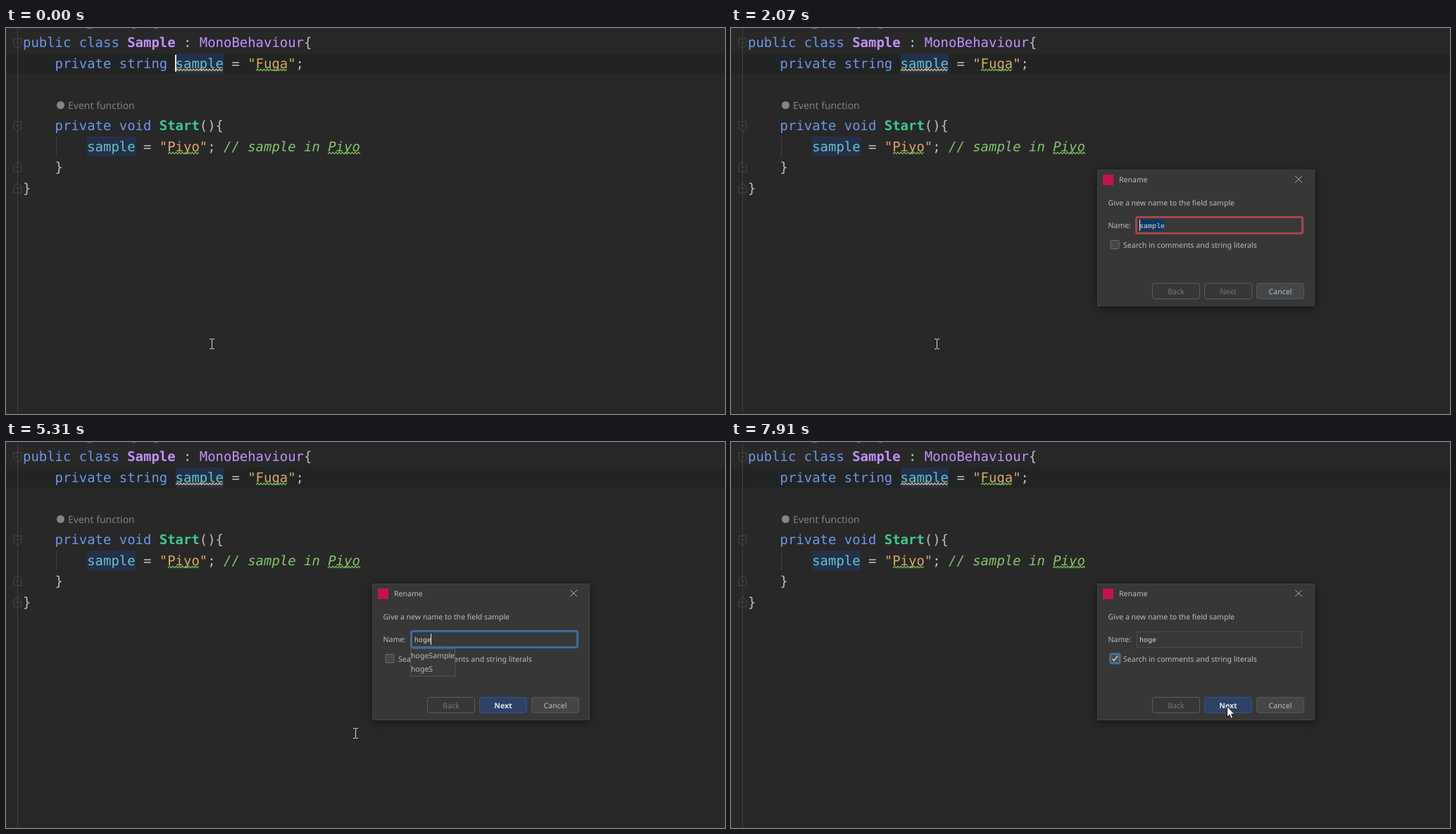
These frames come from a looping animation (1021 px wide and 548 px high, 8000 ms). An HTML page with a canvas:

```html
<!DOCTYPE html>
<html lang="en">
<head>
<meta charset="utf-8">
<title>Rename a field</title>
<style>
html, body { margin: 0; width: 100%; height: 100%; overflow: hidden; background: #282828; }
canvas { display: block; width: 1021px; height: 548px; }
</style>
</head>
<body>
<canvas id="stage" width="1021" height="548"></canvas>
<script>
const ctx = document.getElementById('stage').getContext('2d');
const LOOP = 8000, COL = 11.4, LINE = 29.57;
const MONO = '18.94px "DejaVu Sans Mono", monospace';
const UI = '10.55px "Noto Sans", sans-serif';
const FIELD = '10px "Liberation Mono", monospace';
const BLUE = '#6c95eb', PURPLE = '#c191ff', PLAIN = '#bdbdbd', CYAN = '#66c3cc',
      STRING = '#d9a962', GREEN = '#39cc8f', COMMENT = '#85c46c', LABEL = '#bbbbbb';
const WARNING = '#cfae68', TYPO = '#6fae4e';

// line, column, text, colour, style
const CODE = [
  [0, 0, 'public class', BLUE], [0, 13, 'Sample', PURPLE, 'bold'], [0, 20, ':', PLAIN],
  [0, 22, 'MonoBehaviour', PURPLE], [0, 35, '{', PLAIN],
  [1, 4, 'private string', BLUE], [1, 19, 'sample', CYAN], [1, 26, '=', PLAIN],
  [1, 28, '"Fuga"', STRING], [1, 34, ';', PLAIN],
  [4, 4, 'private void', BLUE], [4, 17, 'Start', GREEN, 'bold'], [4, 22, '(){', PLAIN],
  [5, 8, 'sample', CYAN], [5, 15, '=', PLAIN], [5, 17, '"Piyo"', STRING], [5, 23, ';', PLAIN],
  [5, 25, '// sample in Piyo', COMMENT, 'italic'],
  [6, 4, '}', PLAIN], [7, 0, '}', PLAIN]
];

// time, x, y of the pointer
const PATH = [
  [0, 292, 448], [3070, 292, 448], [3200, 299, 446], [4990, 299, 446],
  [5050, 312, 445], [5180, 420, 429], [5310, 496, 413], [5500, 526, 362], [5690, 534, 319],
  [5810, 534, 319], [6250, 539, 307], [7260, 539, 307],
  [7450, 572, 322], [7650, 655, 352], [7910, 704, 375], [8000, 704, 375]
];

// time, field text, popup stem
const TYPING = [[3990, 'h', 'h'], [4170, 'ho', 'ho'], [4420, 'hog', 'ho'], [4490, 'hog', 'hog'], [4740, 'hoge', 'hoge']];

// time, opacity of the opening window
const OPENING = [[1810, 0.18], [1880, 0.55], [1945, 0.85], [2005, 1]];

const within = (t, a, b) => t >= a && t < b;
const lastBefore = (list, t) => list.filter(item => item[0] <= t).pop();

function fill(x, y, w, h, color) {
  ctx.fillStyle = color;
  ctx.fillRect(x, y, w, h);
}

function text(str, x, y, color, font = UI, align = 'left') {
  ctx.font = font;
  ctx.textAlign = align;
  ctx.fillStyle = color;
  ctx.fillText(str, x, y);
}

function line(points, color, width = 1, close = false) {
  ctx.beginPath();
  points.forEach(([x, y]) => ctx.lineTo(x, y));
  if (close) ctx.closePath();
  ctx.strokeStyle = color;
  ctx.lineWidth = width;
  ctx.stroke();
}

function box(x, y, w, h, r, bg, border, width = 1) {
  ctx.beginPath();
  ctx.roundRect(x + width / 2, y + width / 2, w - width, h - width, r);
  if (bg) { ctx.fillStyle = bg; ctx.fill(); }
  ctx.strokeStyle = border;
  ctx.lineWidth = width;
  ctx.stroke();
}

function wave(x0, x1, y, color) {
  const points = [];
  for (let x = x0, i = 0; x <= x1; x += 2.3, i++) points.push([x, y + (i % 2 ? -1.2 : 1.2)]);
  line(points, color, 1.3);
}

function foldMark(y, up) {
  const d = up ? -1 : 1;
  line([[11, y - 6 * d], [22, y - 6 * d], [22, y + 3 * d], [16.5, y + 8 * d], [11, y + 3 * d]], '#484848', 1, true);
  line([[14, y - 0.5], [19, y - 0.5]], '#484848');
}

function drawEditor(t) {
  fill(0, 0, 1021, 548, '#282828');
  fill(0, 36, 1021, 29, '#222424');
  fill(241, 36, 68, 29, '#243048');
  fill(115, 154, 69, 28, '#243048');
  fill(16, 0, 1, 548, '#3f3f3f');
  fill(71, 154, 1, 28, '#404040');
  for (const [x, w] of [[115, 7], [179, 5], [210, 5]]) fill(x, 0, w, 1, '#686868');

  foldMark(21, false);
  foldMark(139, false);
  foldMark(198, true);
  foldMark(228, true);

  for (const [row, col, str, color, style = ''] of CODE)
    text(str, 24 + col * COL, 27 + row * LINE, color, `${style} ${MONO}`);

  wave(241, 309, 59.5, WARNING);
  wave(355, 401, 59.5, TYPO);
  wave(230, 275, 177.5, TYPO);
  wave(457, 504, 177.5, TYPO);

  ctx.beginPath();
  ctx.arc(77.5, 109.5, 5.5, 0, 7);
  ctx.fillStyle = '#858585';
  ctx.fill();
  text('Event function', 88, 115, '#808080', '14px "Noto Sans", sans-serif');

  if (t < 310 || within(t, 810, 1310)) fill(240, 38, 2, 24, '#e8e8e8');
}

function windowFrame(y, h, shadow = true) {
  ctx.save();
  if (shadow) {
    ctx.shadowColor = 'rgba(0,0,0,0.5)';
    ctx.shadowBlur = 12;
    ctx.shadowOffsetY = 3;
  }
  fill(520, y, 309, h, '#373737');
  ctx.restore();
  line([[520.5, y + .5], [828.5, y + .5], [828.5, y + h - .5], [520.5, y + h - .5]], '#424242', 1, true);
  fill(528, y + 7, 15, 15, '#c4124f');
  text('Rename', 551, y + 18, LABEL);
  line([[801, y + 9], [811, y + 18.5]], '#b0b0b0');
  line([[811, y + 9], [801, y + 18.5]], '#b0b0b0');
}

function button(label, x, y, kind) {
  const [bg, border, color] = {
    off: [null, '#5c5c5c', '#777777'],
    normal: ['#434648', '#555759', LABEL],
    primary: ['#2e4267', '#3a527d', '#e4e4e4'],
    dark: ['#303030', '#222222', LABEL]
  }[kind];
  box(x, y, 68, 23, 3, bg, border);
  text(label, x + 34, y + 16, color, kind === 'primary' ? 'bold ' + UI : UI, 'center');
}

function drawPreparing(alpha) {
  const scale = 0.949 + 0.051 * alpha;
  ctx.save();
  ctx.globalAlpha = alpha;
  ctx.translate(674.5, 297);
  ctx.scale(scale, scale);
  ctx.translate(-674.5, -297);
  windowFrame(233, 128, alpha === 1);
  text('Preparing data for refactoring', 531, 319, LABEL);
  fill(531, 322, 285, 3, '#181818');
  button('Back', 598, 329, 'off');
  button('Next', 672, 329, 'off');
  box(670, 327, 72, 27, 3, null, '#101010', 3);
  button('Cancel', 746, 329, 'dark');
  ctx.restore();
}

function drawField(typed, focused, caretOn) {
  const value = typed ? typed[1] : 'sample';
  if (focused) box(574, 267, 239, 26, 2, '#383838', typed ? '#3d6a9e' : '#a3464c', 3);
  else box(576, 269, 235, 23, 0, '#383838', '#4b4b4b');
  if (!typed) fill(580, 272, 35, 16, '#0d3962');
  text(value, 580, 284, '#d8d8d8', FIELD);
  if (caretOn) fill(typed ? 579 + value.length * 6 : 580, 272, 1, 16, '#e8e8e8');
}

function drawPopup(stem) {
  ctx.font = UI;
  const width = Math.round(ctx.measureText(stem + 'Sample').width) + 2;
  box(574, 293, width, 40, 0, '#3a3a3a', '#555555');
  text(stem + 'Sample', 575, 307, LABEL);
  text(stem + 'S', 575, 326, LABEL);
}

function drawCheckbox(focused, checked) {
  if (focused) box(537, 299, 17, 17, 3, '#3d6185', '#3d6185', 2);
  box(538.5, 301, 13, 13, 1, '#43494a', focused ? '#5f88ad' : '#6b6b6b');
  if (checked) line([[541.5, 307.5], [544, 310.5], [549, 303.5]], '#c0c0c0', 1.8);
  text('Search in comments and string literals', 557, 312, LABEL);
}

function drawRename(t) {
  const typed = lastBefore(TYPING, t);
  const focused = t < 6560;
  const caretOn = focused && !within(t, 2320, 2820) && !within(t, 3310, 3860) &&
    !within(t, 5360, 5870) && !within(t, 6370, 6560);
  windowFrame(201, 194);
  text('Give a new name to the field sample', 535.5, 252, LABEL);
  text('Name:', 535.5, 284, LABEL);
  drawField(typed, focused, caretOn);
  drawCheckbox(!focused, t >= 6640);
  if (typed && focused) drawPopup(typed[2]);
  button('Back', 598, 362, 'off');
  button('Next', 672, 362, typed ? 'primary' : 'off');
  button('Cancel', 746, 362, 'normal');
}

function pointerAt(t) {
  const i = Math.max(1, PATH.findIndex(p => p[0] > t));
  const [t0, x0, y0] = PATH[i - 1], [t1, x1, y1] = PATH[i];
  const k = (t - t0) / (t1 - t0);
  return [Math.round(x0 + (x1 - x0) * k), Math.round(y0 + (y1 - y0) * k)];
}

// The pointer rests until each span starts, then is sampled about every 65 ms.
function sampled(t) {
  for (const [start, end] of [[3130, 3310], [5050, 5690], [5870, 6640], [7320, 7910]]) {
    if (within(t, start, end)) return start + Math.floor((t - start) / 65) * 65;
    if (within(t, start - 100, start)) return start - 100;
  }
  return t;
}

function drawPointer(t) {
  const [x, y] = pointerAt(sampled(t));
  const arrow = x >= 520 && y < 395;
  ctx.save();
  ctx.translate(x, y);
  if (arrow) {
    ctx.beginPath();
    [[.5, .5], [.5, 15.5], [4, 12.3], [6.3, 17.3], [8.7, 16.2], [6.5, 11.3], [11, 11.3]]
      .forEach(([px, py]) => ctx.lineTo(px, py));
    ctx.closePath();
    ctx.fillStyle = '#ffffff';
    ctx.fill();
    ctx.strokeStyle = '#111111';
    ctx.lineWidth = 1;
    ctx.stroke();
  } else {
    fill(0, -6, 1, 13, '#d8d8d8');
    for (const py of [-7, 7]) {
      fill(-3, py, 3, 1, '#d8d8d8');
      fill(1, py, 3, 1, '#d8d8d8');
    }
  }
  ctx.restore();
}

function draw(t) {
  ctx.textRendering = 'geometricPrecision';
  drawEditor(t);
  if (t >= 2070) drawRename(t);
  else if (t >= 1810) drawPreparing(lastBefore(OPENING, t)[1]);
  drawPointer(t);
}

const start = performance.now();
function frame() {
  draw((performance.now() - start) % LOOP);
  requestAnimationFrame(frame);
}
frame();
</script>
</body>
</html>
```
